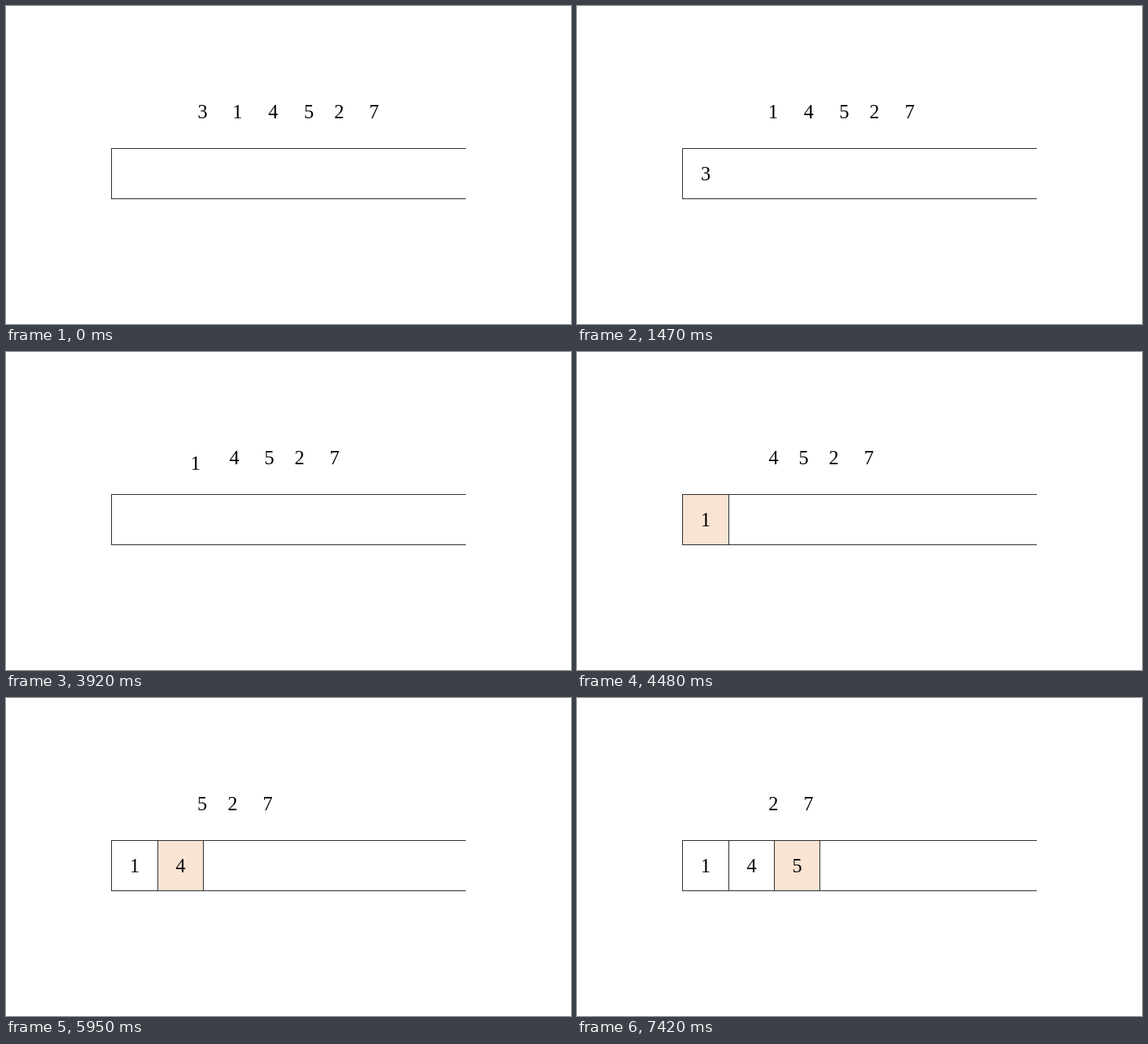
An HTML page with a canvas that plays this animation: 720 by 405 pixels, repeating every 8000 ms.

```html
<!DOCTYPE html>
<html lang="en">
<head>
<meta charset="utf-8">
<title>Queue</title>
<style>
  html, body { margin: 0; width: 100%; height: 100%; overflow: hidden; background: #fff; }
  canvas { display: block; width: 100vw; height: 100vh; }
</style>
</head>
<body>
<canvas id="stage" width="720" height="405"></canvas>
<script>
const ctx = document.getElementById('stage').getContext('2d');

const LOOP = 8000, STEP = 70, STEPS = 9;
const LINE = '#2b2b2b';
const TINT = [249, 227, 211];
const ROW_Y = 142.5, CELL_Y = 222;
const TOP = 181, BOTTOM = 245;
const WALLS = [134, 193, 251, 309];

const digits = ['3', '1', '4', '5', '2', '7'];

// Places of the waiting digits, before and after each enqueue
const rows = [
  [250.5, 295, 340.5, 386, 424.5, 469],
  [250, 295.3, 340.5, 379, 424],
  [250.5, 288.7, 327.2, 372],
  [250, 288.7, 333.5],
  [250.3, 295]
];

const moves = [
  { at: 910, slot: 0, gone: 2380 },
  { at: 3850, slot: 0 },
  { at: 5320, slot: 1 },
  { at: 6790, slot: 2 }
];

const mix = (a, b, p) => a + (b - a) * p;
const ease = u => u < 0.5 ? 2 * u * u : 1 - 2 * (1 - u) * (1 - u);
const slotX = slot => (WALLS[slot] + WALLS[slot + 1] + 1) / 2;

// Number of steps a move has taken; the cell appears one step after the digit lands
const stepsAt = (move, t) => t < move.at ? 0 : Math.floor((t - move.at) / STEP) + 1;
const progress = steps => ease(Math.min(steps / STEPS, 1));

function drawDigit(i, x, y) {
  ctx.fillStyle = '#000';
  ctx.fillText(digits[i], x, y);
}

function drawCell(i, t) {
  const { slot } = moves[i];
  const next = moves[i + 1];
  const fade = next ? progress(stepsAt(next, t)) : 0;
  const left = WALLS[slot] + 1, right = WALLS[slot + 1];
  ctx.fillStyle = `rgb(${TINT.map(c => Math.round(mix(c, 255, fade))).join(',')})`;
  ctx.fillRect(left, TOP + 1, right - left, BOTTOM - TOP - 1);
  ctx.fillStyle = LINE;
  ctx.fillRect(right, TOP, 1, BOTTOM - TOP + 1);
  drawDigit(i, slotX(slot), CELL_Y);
}

function drawFrame() {
  ctx.fillStyle = LINE;
  ctx.fillRect(134, TOP, 452, 1);
  ctx.fillRect(134, BOTTOM, 452, 1);
  ctx.fillRect(134, TOP, 1, BOTTOM - TOP + 1);
}

function draw(t) {
  ctx.fillStyle = '#fff';
  ctx.fillRect(0, 0, 720, 405);
  ctx.font = '25px "Liberation Serif", "Times New Roman", serif';
  ctx.textAlign = 'center';
  drawFrame();

  let done = 0;
  moves.forEach((move, i) => {
    if (stepsAt(move, t) <= STEPS) return;
    done = i + 1;
    if (!move.gone || t < move.gone) drawCell(i, t);
  });

  const move = moves[done];
  const p = move ? progress(stepsAt(move, t)) : 0;
  rows[done].forEach((x, j) => {
    if (!move) drawDigit(done + j, x, ROW_Y);
    else if (j === 0) drawDigit(done, mix(x, slotX(move.slot), p), mix(ROW_Y, CELL_Y, p));
    else drawDigit(done + j, mix(x, rows[done + 1][j - 1], p), ROW_Y);
  });
}

function tick() {
  draw(performance.now() % LOOP);
  requestAnimationFrame(tick);
}
tick();
</script>
</body>
</html>
```
